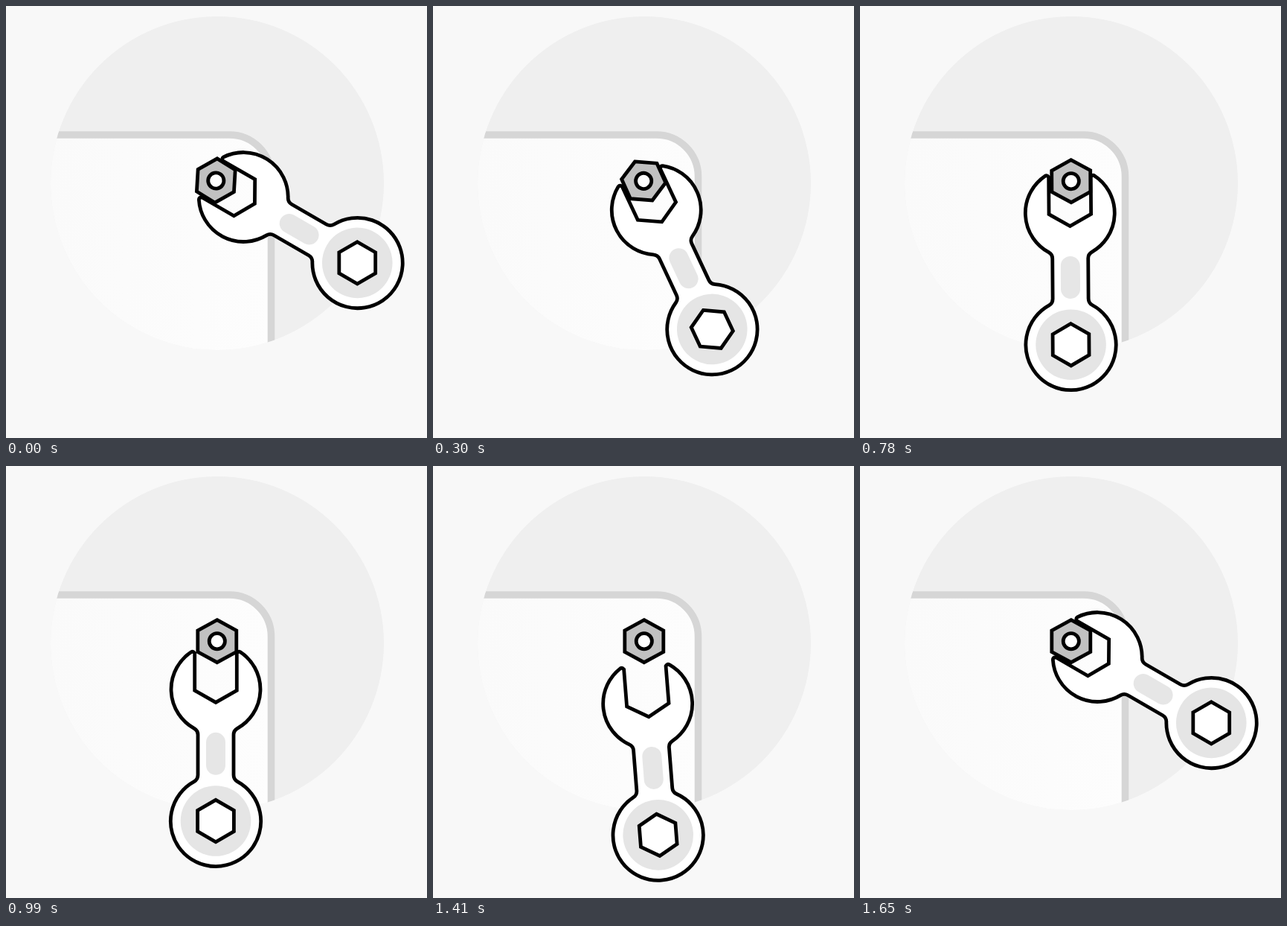
An HTML page for the animation above (1.86 s loop, 566 by 580 pixels).

```html
<!DOCTYPE html>
<html lang="en">
<head>
<meta charset="utf-8">
<title>Wrench and nut</title>
<style>
  html, body { margin: 0; width: 100%; height: 100%; overflow: hidden; background: #f8f8f8; }
  svg { display: block; width: 100%; height: 100%; }
  .line { stroke: #000; stroke-width: 4.8; }
</style>
</head>
<body>
<svg viewBox="0 0 566 580">
  <defs>
    <clipPath id="disc"><circle cx="284" cy="238" r="224"/></clipPath>
    <linearGradient id="panel">
      <stop offset="0" stop-color="#fafafa"/>
      <stop offset="1" stop-color="#fdfdfd"/>
    </linearGradient>
  </defs>
  <g clip-path="url(#disc)">
    <rect width="566" height="580" fill="#efefef"/>
    <path d="M60 173H300.5A56 56 0 0 1 356.5 229V470H60Z" fill="url(#panel)"/>
    <path d="M50 173H300.5A56 56 0 0 1 356.5 229V470" fill="none" stroke="#d6d6d6" stroke-width="9.6"/>
  </g>
  <!-- local origin is the nut axis -->
  <g id="wrench">
    <path class="line" fill="#fff" d="M-28.3 -5.5V44.5L0 60.5L28.3 44.5V-5.5Q30.5 -8.5 33 -7.1
      A60 60 0 0 1 29 95.5Q24 98.3 24 104V158Q24 163.9 29 166.7
      A60.7 60.7 0 1 1 -29 166.7Q-24 163.9 -24 158V104Q-24 98.3 -29 95.5
      A60 60 0 0 1 -33 -7.1Q-30.5 -8.5 -28.3 -5.5Z"/>
    <rect x="-13" y="101" width="26" height="57" rx="13" fill="#e6e6e6"/>
    <circle cy="219.7" r="47.3" fill="#e5e5e5"/>
    <path class="line" fill="#fff" d="M0 191.5L24.4 205.6V233.8L0 247.9L-24.4 233.8V205.6Z"/>
  </g>
  <g id="nut">
    <path class="line" fill="#c1c1c1" d="M0 -28.5L26 -14.3V14.3L0 28.5L-26 14.3V-14.3Z"/>
    <circle class="line" r="10.6" fill="#fff"/>
  </g>
</svg>
<script>
  const LOOP = 1860, STEP = 30, TURN = 60, PULL = 41.5;
  const wrench = document.getElementById('wrench');
  const nut = document.getElementById('nut');

  const span = (t, a, b) => Math.min(1, Math.max(0, (t - a) / (b - a)));
  const outQuad = x => 1 - (1 - x) ** 2;
  const inOutSine = x => (1 - Math.cos(Math.PI * x)) / 2;

  function draw(t) {
    const turn = outQuad(span(t, 0, 850));
    const pull = inOutSine(span(t, 840, 1130));
    const back = span(t, 1173, 1625) ** 4;

    const angle = -TURN * (1 - turn + back);
    const shift = PULL * (pull - back ** 2.7);
    wrench.setAttribute('transform', `translate(282 235) rotate(${angle}) translate(0 ${shift})`);

    const left = 1 - turn;
    nut.setAttribute('transform',
      `translate(${283.8 - 1.5 * left} ${235.2 - 0.7 * left}) rotate(${-58 * left})`);
  }

  const start = performance.now();
  function tick() {
    const t = (performance.now() - start) % LOOP;
    draw(Math.floor(t / STEP) * STEP);
    requestAnimationFrame(tick);
  }
  draw(0);
  requestAnimationFrame(tick);
</script>
</body>
</html>
```
